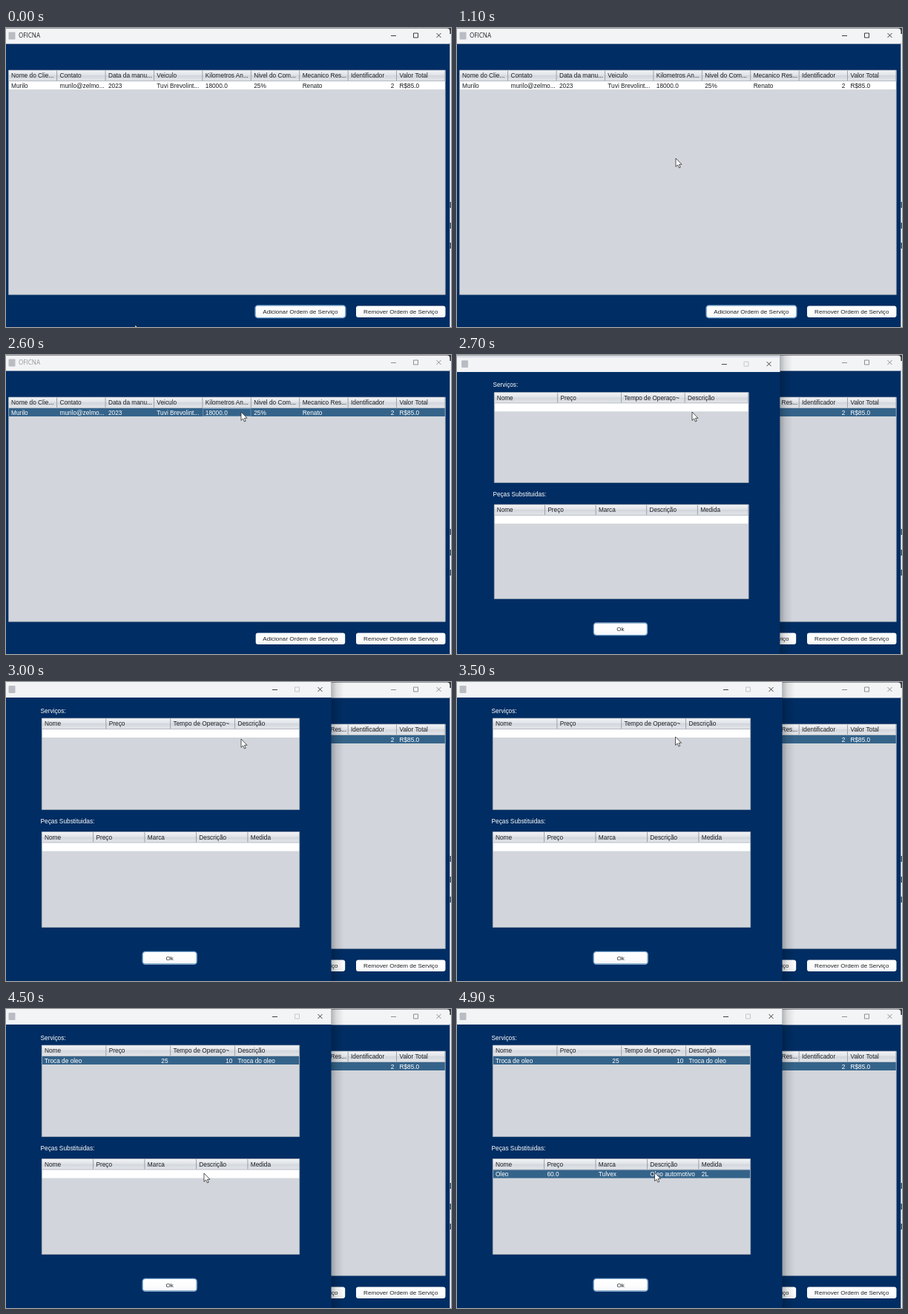
These frames come from a looping animation (600x404 px, 5 s). An HTML page:

```html
<!DOCTYPE html>
<html lang="pt">
<head>
<meta charset="utf-8">
<title>Oficina</title>
<style>
  html, body { margin: 0; width: 100%; height: 100%; overflow: hidden; background: #002d63; }
  svg { display: block; width: 100vw; height: 100vh; }
  text { font: 8.3px "Liberation Sans", Arial, sans-serif; fill: #1c1f24; white-space: pre; }
  .title { font: 8.1px "Open Sans", sans-serif; }
  .button { font-size: 8.1px; text-anchor: middle; }
  .label { fill: #fff; }
  .end { text-anchor: end; }
  .row rect { fill: #fff; }
  .row.on rect { fill: #34638a; }
  .row.on text { fill: #fff; }
  .row .cell, .ring { visibility: hidden; }
  .row.on .cell { visibility: visible; fill: none; stroke: #7fa2bd; stroke-width: .7; }
  .focus .ring { visibility: visible; }
  .controls { fill: none; stroke: #2b2b2b; stroke-width: .9; }
  .inactive .title { fill: #949494; }
  .inactive .controls { stroke: #858585; }
</style>
</head>
<body>
<svg id="stage" viewBox="0 0 600 404" preserveAspectRatio="none"></svg>
<script>
const LOOP = 5000, STEP = 100;
const SELECT_ORDER = 2300, DEACTIVATE = 2600, OPEN = 2700, SETTLE = 2800;
const SELECT_SERVICE = 3900, SELECT_PART = 4700;

// Pointer stops: time, x, y
const path = [
  [0, 174, 401], [200, 176, 397], [700, 272, 228], [1100, 295, 176],
  [1400, 296, 174], [1900, 316, 79], [2300, 317, 77], [3100, 317, 77],
  [3500, 294.5, 74], [4000, 294, 72], [4400, 267, 222], [5000, 266.5, 221]
];

const rect = (x, y, w, h, fill, more = '') =>
  `<rect x="${x}" y="${y}" width="${w}" height="${h}" fill="${fill}" ${more}/>`;
const text = (x, y, str, cls = '') => `<text x="${x}" y="${y}" class="${cls}">${str}</text>`;

function table(t) {
  const { x, y, w, h, heads, cells, id, numeric = [], cell } = t;
  const col = w / heads.length;
  const left = i => x + i * col;
  let out = rect(x, y, w, h, '#d2d6dc') + rect(x, y, w, 14.3, 'url(#head)');
  out += heads.map((s, i) =>
    text(left(i) + 3.6, y + 10.4, s) +
    rect(left(i + 1) - .7, y + .5, .8, 13.6, '#8d939d')).join('');
  out += rect(x, y + 14, w, 1, '#b4b8c0');
  out += `<g id="${id}" class="row">` + rect(x + .4, y + 15, w - .8, 11, '#fff');
  if (cell !== undefined) {
    out += `<path class="cell" d="M${left(cell) + .4} ${y + 15.4}h${col - 1}v10.2h${1 - col}z"/>`;
  }
  out += cells.map((s, i) => numeric.includes(i)
    ? text(left(i + 1) - 3.4, y + 23.8, s, 'end')
    : text(left(i) + 3.6, y + 23.8, s)).join('') + '</g>';
  return out + `<path d="M${x} ${y}h${w}v${h}h${-w}z" fill="none" stroke="#a3a9b3" stroke-width=".7"/>`;
}

function button(x, y, w, h, label, id) {
  return `<g id="${id}">` +
    rect(x - .6, y - .6, w + 1.2, h + 1.2, 'none', 'class="ring" rx="3.6" stroke="#79a6d0" stroke-width="1.4"') +
    rect(x, y, w, h, 'url(#face)', 'rx="3"') +
    text(x + w / 2, y + h / 2 + 2.8, label, 'button') + '</g>';
}

// Minimise, maximise and close, 30 px apart
function controls(x, y, noMax) {
  return `<g class="controls"><path d="M${x - 3.5} ${y + .5}h7"/>` +
    `<path d="M${x + 27} ${y - 3}h6v6h-6z" ${noMax ? 'style="stroke:#c2c2c2"' : ''}/>` +
    `<path d="M${x + 58} ${y - 3}l6 6m0-6l-6 6"/></g>`;
}

const icon = (x, y) => rect(x - 4.5, y - 5, 9, 10, '#b9bdc3', 'rx="1"');

// A light page shows past the right edge of the window
const backdrop = rect(0, 0, 600, 8, '#3a3d42') + rect(590, 8, 10, 396, '#f1f2f4') +
  [235, 263, 290].map(y => rect(598.5, y, 1.5, 8, '#3b4a5f')).join('');

const mainWindow = backdrop + `<g id="main">` +
  rect(0, 20, 598.4, 384, '#002d63') +
  `<path d="M0 .4H594.4Q598.4 .4 598.4 4.4V21.5H0z" fill="#f3f4f6"/>` +
  icon(8, 10.5) + text(17, 13.3, 'OFICNA', 'title') + controls(522.5, 10) +
  table({
    id: 'order', x: 3.5, y: 57, w: 588.8, h: 303.3, cell: 4, numeric: [7],
    heads: ['Nome do Clie...', 'Contato', 'Data da manu...', 'Veiculo', 'Kilometros An...',
      'Nivel do Com...', 'Mecanico Res...', 'Identificador', 'Valor Total'],
    cells: ['Murilo', 'murilo@zelmo...', '2023', 'Tuvi Brevolint...', '18000.0',
      '25%', 'Renato', '2', 'R$85.0']
  }) +
  button(336.7, 375.6, 120.5, 15.4, 'Adicionar Ordem de Serviço', 'add') +
  button(472, 375.6, 120.5, 15.4, 'Remover Ordem de Serviço', 'remove') + '</g>';

const dialog = `<g id="dialog">` +
  rect(438.6, -4, 17, 420, 'url(#shade)') +
  rect(-10, 0, 448.6, 420, '#002d63') + rect(-10, 0, 448.6, 21, '#f3f4f6') +
  icon(8, 10) + controls(362.5, 10, true) +
  text(46.5, 41.6, 'Serviços:', 'label') +
  table({
    id: 'service', x: 48.3, y: 49, w: 347.4, h: 123.5, numeric: [1, 2],
    heads: ['Nome', 'Preço', 'Tempo de Operaço~', 'Descrição'],
    cells: ['Troca de oleo', '25', '10', 'Troca do oleo']
  }) +
  text(46.5, 191, 'Peças Substituidas:', 'label') +
  table({
    id: 'part', x: 48.3, y: 202.5, w: 347.4, h: 129,
    heads: ['Nome', 'Preço', 'Marca', 'Descrição', 'Medida'],
    cells: ['Oleo', '60.0', 'Tulvex', 'Oleo automotivo', '2L']
  }) +
  `<g class="focus">${button(184.8, 365, 71.8, 15.6, 'Ok', 'ok')}</g></g>`;

const stop = (at, color, opacity = 1) =>
  `<stop offset="${at}" stop-color="${color}" stop-opacity="${opacity}"/>`;
const gradient = (id, axis, stops) =>
  `<linearGradient id="${id}" x1="0" y1="0" x2="${axis === 'x' ? 1 : 0}" y2="${axis === 'x' ? 0 : 1}">${stops}</linearGradient>`;

document.getElementById('stage').innerHTML = '<defs>' +
  gradient('head', 'y', stop(0, '#f4f5f7') + stop(.48, '#dfe2e7') + stop(.52, '#d3d7dd') + stop(1, '#e3e6ea')) +
  gradient('face', 'y', stop(0, '#fff') + stop(.6, '#fdfdfe') + stop(1, '#f4f6f8')) +
  gradient('shade', 'x', stop(0, '#000', .26) + stop(.4, '#000', .1) + stop(1, '#000', 0)) +
  '</defs>' + mainWindow + dialog +
  '<path id="pointer" d="M0 0V11.4L2.6 9L4.4 13L6.2 12.2L4.5 8.3H8Z" fill="#fff" stroke="#222" stroke-width=".75" stroke-linejoin="round"/>';

const el = Object.fromEntries(
  ['main', 'dialog', 'order', 'service', 'part', 'add', 'pointer'].map(id => [id, document.getElementById(id)]));
const ease = p => p * p * (3 - 2 * p);

function pointerAt(t) {
  const i = path.findIndex(k => k[0] > t);
  const [t0, x0, y0] = path[i - 1], [t1, x1, y1] = path[i];
  const p = ease((t - t0) / (t1 - t0));
  return [x0 + (x1 - x0) * p, y0 + (y1 - y0) * p];
}

function draw(t) {
  el.order.classList.toggle('on', t >= SELECT_ORDER);
  el.add.classList.toggle('focus', t < SELECT_ORDER);
  el.main.classList.toggle('inactive', t >= DEACTIVATE);
  el.service.classList.toggle('on', t >= SELECT_SERVICE);
  el.part.classList.toggle('on', t >= SELECT_PART);
  for (const [row, at] of [[el.service, SELECT_SERVICE], [el.part, SELECT_PART]]) {
    row.querySelectorAll('text').forEach(n => n.style.display = t >= at ? '' : 'none');
  }
  el.dialog.style.display = t >= OPEN ? '' : 'none';
  // The dialog grows slightly as it opens
  const scale = t < SETTLE ? .987 : 1;
  el.dialog.setAttribute('transform', `translate(200 172) scale(${scale}) translate(-200 -172)`);
  el.pointer.setAttribute('transform', `translate(${pointerAt(t)})`);
}

function tick() {
  const t = performance.now() % LOOP;
  draw(Math.floor(t / STEP) * STEP);
  requestAnimationFrame(tick);
}
tick();
</script>
</body>
</html>
```
